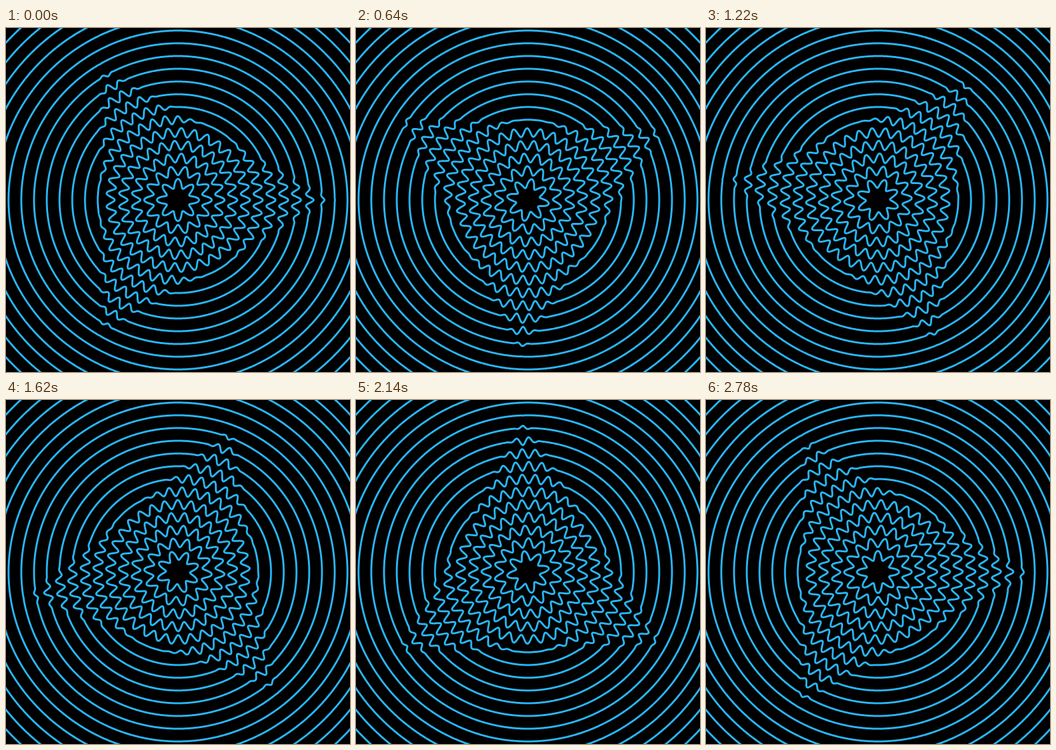
Write an HTML page with a canvas that moves like this. It is 540 px wide and 540 px high and loops after 2.8 s.

```html
<!DOCTYPE html>
<html lang="en">
<head>
<meta charset="utf-8">
<title>Rippled rings</title>
<style>
html, body { margin: 0; height: 100%; overflow: hidden; background: #000; }
canvas { display: block; }
</style>
</head>
<body>
<canvas id="stage" width="540" height="540"></canvas>
<script>
const LOOP = 2800, TAU = 2 * Math.PI, STEPS = 1000;
const APOTHEM = 127, FADE = 25, HEIGHT = 7, WAVELENGTH = 20;
const ctx = document.getElementById('stage').getContext('2d');

// 0 outside the triangle, rising smoothly to 1 inside it
function envelope(r, angle) {
  const side = TAU / 3;
  const fromVertex = ((angle % side) + side) % side;
  const depth = APOTHEM - r * Math.cos(fromVertex - side / 2);
  const x = Math.min(1, Math.max(0, depth / FADE));
  return x * x * (3 - 2 * x);
}

function ring(r, t) {
  const waves = Math.round(TAU * r / WAVELENGTH);
  // whole wavelengths travelled per loop; outer rings run faster
  const shift = Math.round(Math.sqrt(waves) / 1.5 - 0.63);
  const turn = -t * TAU / 3;
  ctx.beginPath();
  for (let i = 0; i < STEPS; i++) {
    const a = i / STEPS * TAU;
    const d = r + HEIGHT * envelope(r, a - turn) * Math.cos(waves * a - shift * TAU * t);
    ctx.lineTo(270 + d * Math.cos(a), 270 + d * Math.sin(a));
  }
  ctx.closePath();
  ctx.stroke();
}

function draw(now) {
  const t = now % LOOP / LOOP;
  ctx.fillStyle = '#000';
  ctx.fillRect(0, 0, 540, 540);
  ctx.strokeStyle = '#29b6f6';
  ctx.lineWidth = 3;
  ctx.lineJoin = 'round';
  for (let r = 26; r < 400; r += 20) ring(r, t);
  requestAnimationFrame(draw);
}
draw(0);
</script>
</body>
</html>
```
